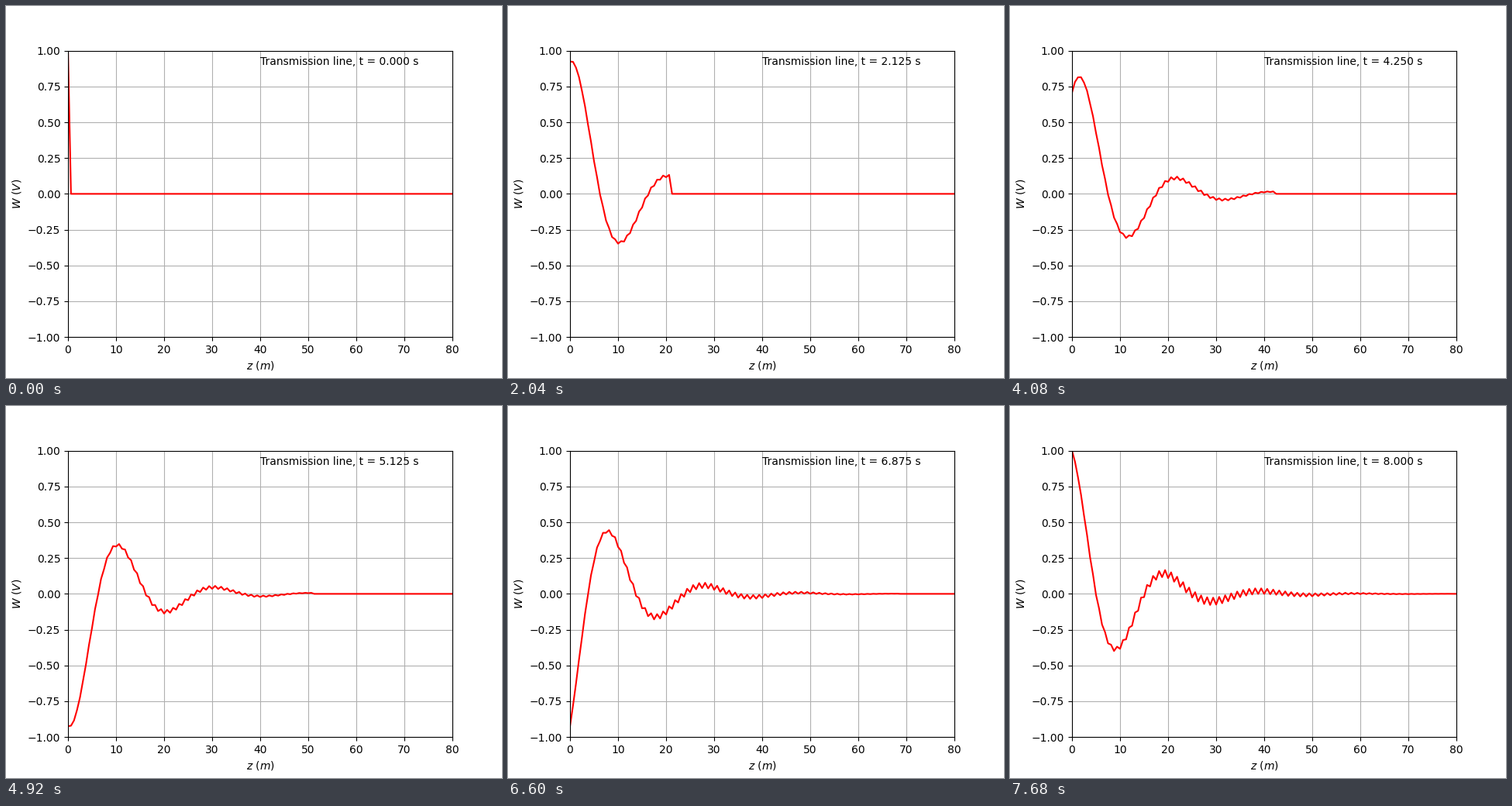
A matplotlib script that plays this animation: 640x480 px, repeating every 7740 ms.

```python
import numpy as np
import matplotlib.pyplot as plt
from matplotlib.animation import FuncAnimation

# Lossy line: W_tt + 2a W_t + a^2 W = c^2 W_zz, driven by a cosine at z = 0
LENGTH, DURATION, STEPS = 80.0, 8.0, 128
LOSS = 1.0
FREQ = 0.5

z = np.linspace(0, LENGTH, STEPS + 1)
t = np.linspace(0, DURATION, STEPS + 1)
dt = t[1]


def solve():
    """Leapfrog scheme at Courant number 1, starting from rest."""
    w = np.zeros((STEPS + 1, STEPS + 1))
    w[:, 0] = np.cos(2 * np.pi * FREQ * t)
    h = LOSS * dt
    for n in range(1, STEPS):
        now, old = w[n], w[n - 1]
        w[n + 1, 1:-1] = (now[2:] + now[:-2] - h**2 * now[1:-1]
                          - (1 - h) * old[1:-1]) / (1 + h)
    return w


W = solve()

fig, ax = plt.subplots(figsize=(6.4, 4.8), dpi=100)
ax.set_xlim(0, LENGTH)
ax.set_ylim(-1, 1)
ax.set_xlabel(r"$z \ (m)$")
ax.set_ylabel(r"$W \ (V)$")
ax.grid(True)
line, = ax.plot(z, W[0], "r")
label = ax.text(40, 0.9, "")


def update(n):
    line.set_ydata(W[n])
    label.set_text(f"Transmission line, t = {t[n]:.3f} s")
    return line, label


anim = FuncAnimation(fig, update, frames=STEPS + 1, interval=60,
                     repeat=True, repeat_delay=0)
plt.show()
```
